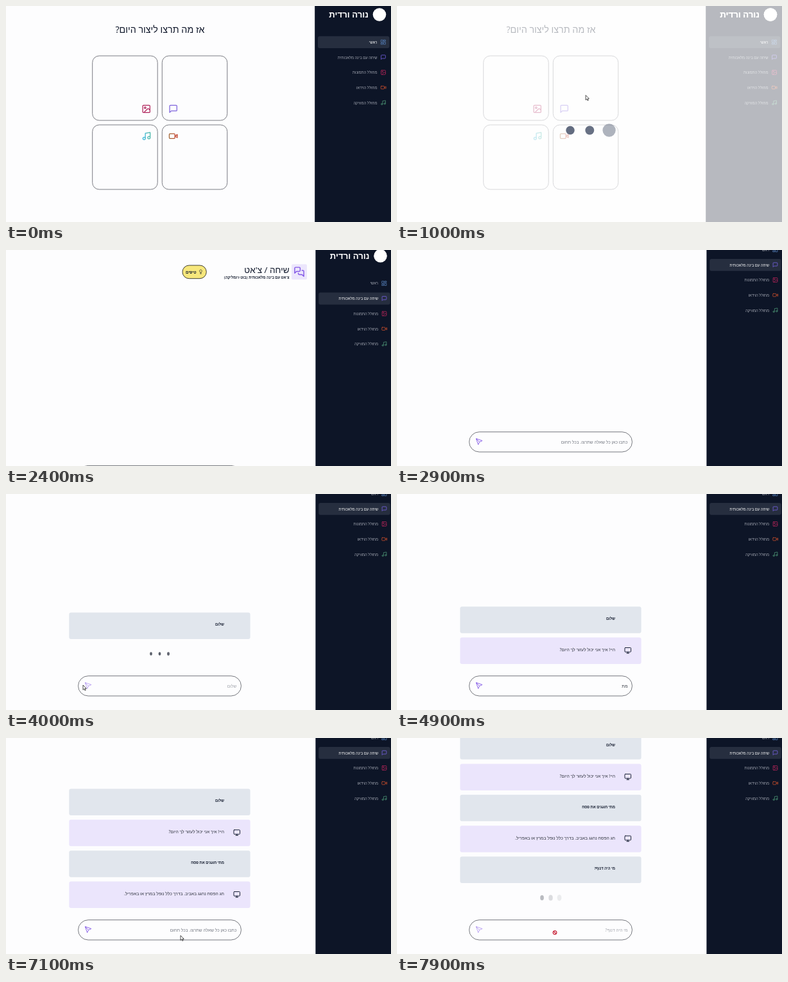
An HTML page for the animation above (8000 ms loop, 600 px wide and 338 px high).

```html
<!DOCTYPE html>
<html lang="he">
<head>
<meta charset="utf-8">
<style>
html, body { margin: 0; height: 100%; overflow: hidden; background: #fdfdfe; }
svg { display: block; width: 100vw; height: 100vh; }
text { font-family: "Open Sans", "Liberation Sans", sans-serif; direction: rtl; }
</style>
</head>
<body>
<svg id="stage" viewBox="0 0 600 338"></svg>
<script>
const LOOP = 8000, CLICK = 890, OPEN = 2150, SCROLL = 57;
const INK = '#0f172a', PAPER = '#fdfdfe', PURPLE = '#8257e6';
const HINT = 'כתבו כאן כל שאלה שתרצו. בכל תחום';
const chat = [
  { ask: 'שלום', from: 3100, to: 3500, sent: 3990, reply: 4600, answer: 'היי! איך אני יכול לעזור לך היום?' },
  { ask: 'מתי חוגגים את פסח', from: 4900, to: 5250, sent: 5490, reply: 6300, answer: 'חג הפסח נחגג באביב. בדרך כלל נופל במרץ או באפריל.' },
  { ask: 'מי היה דנוף?', from: 7200, to: 7450, sent: 7540, reply: Infinity }
];
const nav = [
  ['ראשי', 'board', '#547fb8'],
  ['שיחה עם בינה מלאכותית', 'message', '#7d66f0'],
  ['מחולל התמונות', 'image', '#c2265c'],
  ['מחולל הוידאו', 'video', '#d2502c'],
  ['מחולל המוזיקה', 'music', '#4f9a78']
];
// Icons on a 24 unit grid
const icons = {
  board: 'M3 3h7v9H3zM14 3h7v5h-7zM14 12h7v9h-7zM3 16h7v5H3z',
  message: 'M21 15a2 2 0 0 1-2 2H7l-4 4V5a2 2 0 0 1 2-2h14a2 2 0 0 1 2 2z',
  image: 'M5 3h14a2 2 0 0 1 2 2v14a2 2 0 0 1-2 2H5a2 2 0 0 1-2-2V5a2 2 0 0 1 2-2zM7 9a2 2 0 1 0 4 0a2 2 0 1 0-4 0M21 15l-3-3a2 2 0 0 0-3 0L6 21',
  video: 'M22 8l-6 4 6 4zM4 6h10a2 2 0 0 1 2 2v8a2 2 0 0 1-2 2H4a2 2 0 0 1-2-2V8a2 2 0 0 1 2-2z',
  music: 'M9 18V5l12-2v13M3 18a3 3 0 1 0 6 0a3 3 0 1 0-6 0M15 16a3 3 0 1 0 6 0a3 3 0 1 0-6 0',
  talk: 'M14 9a2 2 0 0 1-2 2H6l-4 4V4a2 2 0 0 1 2-2h8a2 2 0 0 1 2 2zM18 9h2a2 2 0 0 1 2 2v11l-4-4h-6a2 2 0 0 1-2-2v-1',
  monitor: 'M4 3h16a2 2 0 0 1 2 2v10a2 2 0 0 1-2 2H4a2 2 0 0 1-2-2V5a2 2 0 0 1 2-2zM8 21h8M12 17v4',
  send: 'M2 2l7 20 4-9 9-4zM2 2l11 11',
  bulb: 'M15 14c.2-1 .7-1.7 1.5-2.5A6 6 0 1 0 7.5 11.5C8.3 12.3 8.8 13 9 14zM9 18h6M10 22h4'
};
// Mouse paths: [time, x, y]; shown from the first to the last time
const mouse = [
  { shape: 'arrow', path: [[500, 330, 235], [800, 294, 135], [950, 294, 135], [1500, 298, 325], [2150, 298, 325]] },
  { shape: 'arrow', path: [[3600, 215, 302], [3850, 120, 299], [4200, 120, 299], [4600, 170, 300], [4900, 240, 301]] },
  { shape: 'hand', path: [[5300, 160, 300], [5450, 126, 299], [5850, 126, 299]] },
  { shape: 'arrow', path: [[5850, 126, 299], [6400, 255, 316], [6900, 272, 309], [7300, 272, 309]] },
  { shape: 'blocked', path: [[7540, 246, 304.5], [8000, 246, 304.5]] }
];
const shapes = {
  arrow: '<path d="M0 0v7.5l1.800-1.600 1.200 2.600 1.200-.6-1.200-2.500h2.300z" fill="#fff" stroke="#222" stroke-width=".8"/>',
  hand: '<path d="M.8 0v4.5L-.5 3.800l-.3.900L1 8h3.400l.8-2.500V3.300L2 2.600V0z" fill="#fff" stroke="#222" stroke-width=".8"/>',
  blocked: '<circle r="2.8" fill="#fff" stroke="#c8263c" stroke-width="1.3"/><path d="M-2-2l4 4" stroke="#c8263c" stroke-width="1.3"/>'
};

const clamp = v => Math.max(0, Math.min(1, v));
const ease = v => v * v * (3 - 2 * v);

function text(str, x, y, size, fill = INK, weight = 400, anchor = 'start') {
  return `<text x="${x}" y="${y}" font-size="${size}" fill="${fill}" font-weight="${weight}" text-anchor="${anchor}">${str}</text>`;
}
function rect(x, y, w, h, r, fill, stroke = 'none', extra = '') {
  return `<rect x="${x}" y="${y}" width="${w}" height="${h}" rx="${r}" fill="${fill}" stroke="${stroke}" ${extra}/>`;
}
function icon(name, cx, cy, size, color, extra = '') {
  const k = size / 24;
  return `<path d="${icons[name]}" transform="translate(${cx - size / 2} ${cy - size / 2}) scale(${k})" fill="none" stroke="${color}" stroke-width="2" stroke-linejoin="round" stroke-linecap="round" ${extra}/>`;
}
function brand(dx) {
  return `<circle cx="${582 + dx}" cy="13.5" r="10.3" fill="#fff"/>` + text('נורה ורדית', 565 + dx, 18, 13.2, '#fff', 700);
}

function sidebar(active, dx) {
  let s = rect(481.2 + dx * .8, -5, 125, 410, 0, '#0d1527') + brand(dx);
  nav.forEach(([label, name, color], i) => {
    const y = 56.5 + i * 23.7, on = i === active;
    if (on) s += rect(486 + dx * .8, y - 9.3, 111.5, 18.8, 3, '#262e3f');
    s += icon(name, 588 + dx, y, 9, color);
    s += text(label, 578.5 + dx, y + 2.3, 5.9, on ? '#fff' : '#a3a8b3', on ? 500 : 400);
  });
  return s;
}

// Each dot grows while it fades, then returns
function dots(age, cx, cy, gap, d, lag, rx, ry, grow, color, dim) {
  let s = '';
  for (let i = 0; i < 3; i++) {
    let u = Math.max(0, age / d - i * lag) % 2;
    if (u > 1) u = 2 - u;
    const e = 1 - (1 - u) ** 2, k = 1 + grow * e;
    s += `<ellipse cx="${cx + gap * (1 - i)}" cy="${cy}" rx="${rx * k}" ry="${ry * k}" fill="${color}" opacity="${1 - dim * e}"/>`;
  }
  return s;
}

function home(t) {
  let s = text('אז מה תרצו ליצור היום?', 240, 41.5, 14.3, INK, 500, 'middle');
  for (const x of [134.7, 243.3])
    for (const y of [78, 186]) s += rect(x, y, 101.5, 101, 10.5, PAPER, '#6c6e75', 'stroke-width=".9"');
  s += icon('image', 218.7, 161, 15, '#b0225a') + icon('message', 260.7, 161, 15, '#7d62dc');
  s += icon('music', 219, 203.5, 15, 'url(#sea)') + icon('video', 260.7, 203.5, 15, 'url(#rust)');
  s += sidebar(0, 0);
  if (t >= CLICK) {
    s += rect(0, 0, 600, 338, 0, '#fff', 'none', 'opacity=".7"') + brand(0);
    s += dots(t - CLICK, 300.3, 194.5, 30.3, 300, .35, 6.7, 6.7, .85, '#636c80', .8);
  }
  return s;
}

function chatPage(t) {
  const scroll = SCROLL * ease(clamp((t - 2300) / 600));
  let s = `<g transform="translate(0 ${-scroll})">` + sidebar(1, 1.5);
  s += rect(445, 26.5, 24, 24, 2, '#ece6fc') + icon('talk', 457, 38.5, 17, PURPLE);
  s += text('שיחה / צ\'אט', 441.5, 40.3, 13.5, INK, 500);
  s += text('צ\'אט עם בינה מלאכותית (בוט ז\'ומליקה)', 441.5, 49.2, 5.8, INK, 600);
  s += rect(275, 28.3, 37.3, 20.7, 10.3, '#f7e77c', '#2b2a20', 'stroke-width=".9"');
  s += text('טיפים', 296.5, 41, 6.3, INK, 600) + icon('bulb', 303.5, 38.5, 7.5, INK);
  s += '</g>';

  const rows = [];
  let busy = null, draft = HINT, tone = '#737780';
  for (const c of chat) {
    if (t >= c.sent) rows.push([c.ask, false]);
    if (t >= c.reply) rows.push([c.answer, true]);
    if (t >= c.sent && t < c.reply) busy = c;
    if (t >= c.from && t < c.reply) {
      draft = c.ask.slice(0, Math.ceil(c.ask.length * clamp((t - c.from + 30) / (c.to - c.from))));
      tone = busy ? '#a0a3aa' : '#30343d';
    }
  }
  const last = busy ? 185.5 : 224.5;
  rows.forEach(([str, bot], i) => {
    const y = last - (rows.length - 1 - i) * 48.35;
    s += rect(98.3, y, 282.3, 41.5, 3, bot ? '#ebe5fc' : '#e1e6ed');
    s += bot ? text(str, 340, y + 21.5, 6.8, '#30343f') : text(str, 340, y + 20.7, 5.8, INK, 600);
    if (bot) s += icon('monitor', 359.8, y + 20.3, 11.5, INK);
  });
  if (busy) s += dots(t - busy.sent, 239.5, 250, 13.5, 400, .25, 1.9, 2.7, .8, '#5b606b', .9);

  const top = 284.7 + SCROLL - scroll;
  s += rect(112.5, top, 254, 31.3, 15.65, PAPER, '#66686f', 'stroke-width=".9"');
  s += text(draft, 359.5, top + 18, 6.7, tone);
  return s + icon('send', 128, top + 15.3, 11, PURPLE, `opacity="${busy ? .55 : 1}"`);
}

function pointer(t) {
  for (const { shape, path } of mouse) {
    for (let i = 1; i < path.length; i++) {
      const [t0, x0, y0] = path[i - 1], [t1, x1, y1] = path[i];
      if (t < t0 || t >= t1) continue;
      const k = ease((t - t0) / (t1 - t0));
      return `<g transform="translate(${x0 + (x1 - x0) * k} ${y0 + (y1 - y0) * k})">${shapes[shape]}</g>`;
    }
  }
  return '';
}

function gradient(id, a, b) {
  return `<linearGradient id="${id}"><stop offset=".2" stop-color="${a}"/><stop offset=".8" stop-color="${b}"/></linearGradient>`;
}
const defs = `<defs>${gradient('sea', '#35b5d8', '#45b5a8')}${gradient('rust', '#a0602f', '#c4452f')}</defs>`;
const stage = document.getElementById('stage');
const start = performance.now();

function draw() {
  const t = (performance.now() - start) % LOOP;
  stage.innerHTML = defs + rect(0, 0, 600, 338, 0, PAPER) + (t < OPEN ? home(t) : chatPage(t)) + pointer(t);
  requestAnimationFrame(draw);
}
draw();
</script>
</body>
</html>
```
